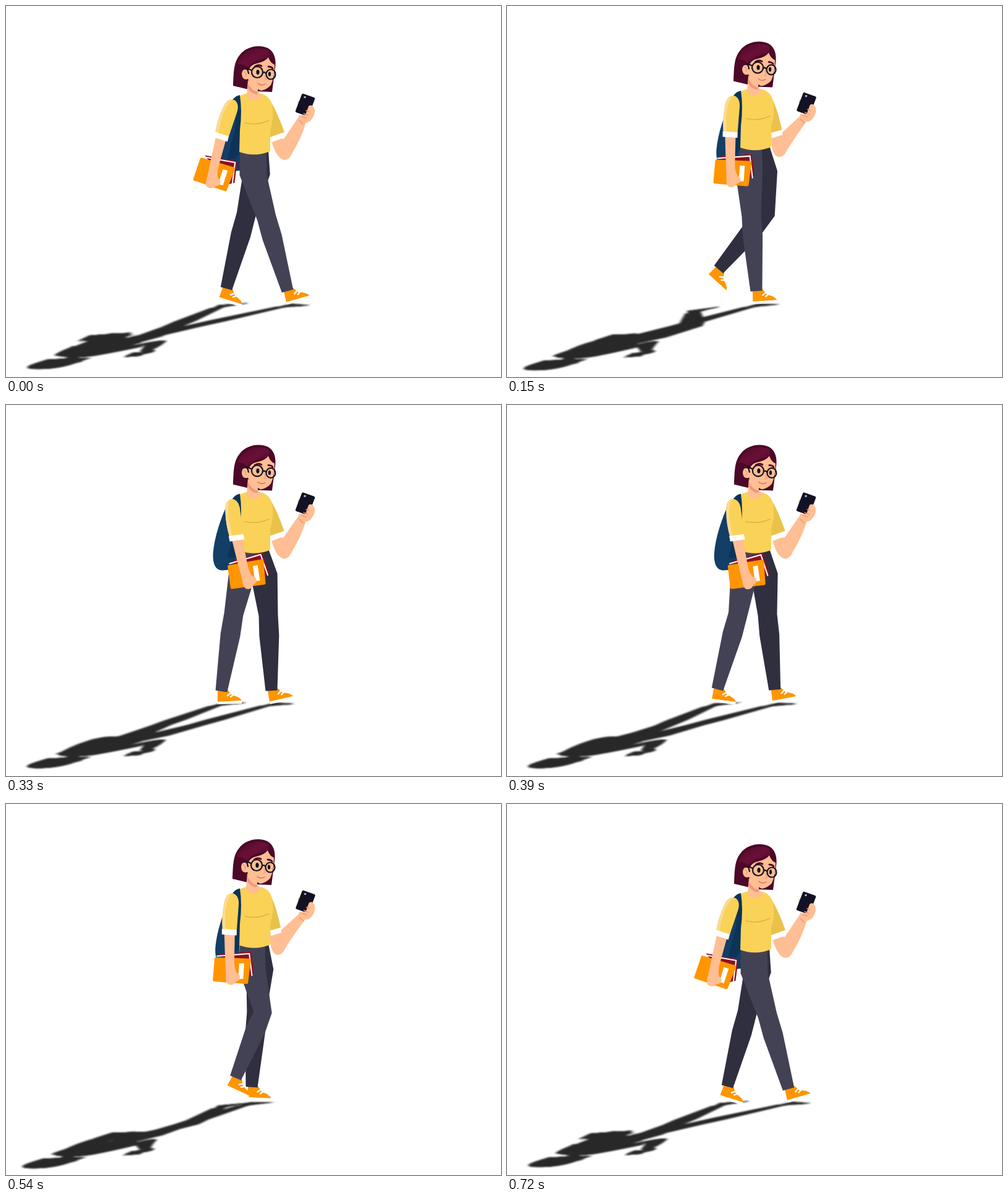
Recreate the animation shown at these times as an HTML page. Size 800 by 600 pixels, loop 750 ms.

```html
<!DOCTYPE html>
<html lang="en">
<head>
<meta charset="utf-8">
<title>Walking with a phone</title>
<style>
html, body { margin: 0; width: 100%; height: 100%; overflow: hidden; background: #fff }
svg { display: block; width: 800px; height: 600px }
.skin { fill: #ffbe93 } .tee { fill: #fad257 } .tee2 { fill: #e9c24c }
.orange { fill: #ff9500 } .white { fill: #fff } .hair { fill: #4c0828 }
.line { fill: none; stroke-linecap: round }
</style>
</head>
<body>
<svg viewBox="0 0 800 600">
  <defs>
    <filter id="shade" filterUnits="userSpaceOnUse" x="0" y="440" width="800" height="160" color-interpolation-filters="sRGB">
      <feColorMatrix values="0 0 0 0 .155  0 0 0 0 .155  0 0 0 0 .155  0 0 0 1 0"/>
      <feGaussianBlur stdDeviation="2.2 1.3"/>
    </filter>
    <linearGradient id="shine" x1="0" y1="0" x2="1" y2="1">
      <stop offset="0" stop-color="#4c0828"/><stop offset=".5" stop-color="#6a1038"/><stop offset="1" stop-color="#4c0828"/>
    </linearGradient>
    <g id="shoe">
      <path class="orange" d="M-6-4H9L17 6Q30 9 33 15L-6 17Z"/>
      <path class="white" d="M-6 17L33 15V20L-6 21Z"/>
      <path class="line" stroke="#fff" stroke-width="2.4" d="M10 7L15 3M15 9L20 5"/>
    </g>
  </defs>

  <g filter="url(#shade)"><use href="#walker" transform="matrix(1 0 .87 -.255 -412.2 604.2)"/></g>

  <g id="walker">
    <path id="pack" fill="#133e66" d="M362 158C350 185 340 214 338 240C337 258 342 267 352 268L376 266L380 160Z"/>
    <use id="farShoe" href="#shoe"/>
    <path id="farLeg" fill="#302f40"/>
    <use id="nearShoe" href="#shoe"/>
    <path id="nearLeg" fill="#434255"/>

    <path id="forearm" class="skin"/>
    <path id="sleeve" class="tee2"/>
    <path id="cuff" class="white"/>
    <g id="hand">
      <path class="skin" d="M473 153Q470 154 472 162L476 160Z"/>
      <path class="skin" d="M471 183L474 176L486 178L488 162Q492 159 497 164Q501 172 496 180Q492 188 485 189Z"/>
      <path fill="#131124" d="M481 142L498 148Q500 149 499 151L489 177Q488 179 486 178L469 172Q467 171 468 169L478 143Q479 141 481 142Z"/>
      <circle cx="483" cy="147.500" r="1.800" fill="#aab0cc"/>
      <path class="skin" d="M489 162Q494 158 498 165Q501 174 494 182L484 187L478 183L477 177L484 176Z"/>
      <path class="line" stroke="#ef9679" stroke-width="1.500" d="M478 179L485 181M481 174L488 177M485 169L490 171M474 185L480 191"/>
    </g>

    <g id="torso">
      <path class="tee" d="M378 145L389 141L414 142Q427 147 430 160Q434 180 427 201V235Q402 245 377 236L375 214L379 185Z"/>
      <path class="line" stroke="#dfb53f" stroke-width="1.500" d="M386 189Q405 194 425 185"/>
      <path fill="#0d3359" d="M366 152Q371 145 378 144Q382 170 378 201L377 238L370 248L358 247L371 195Q374 165 366 152Z"/>
    </g>

    <g id="head">
      <path class="hair" d="M367 129C368 105 368 91 378 79C389 65 409 62 423 68C434 74 437 86 435 100L430 139L404 138L388 134Z"/>
      <path fill="url(#shine)" d="M374 94C381 72 404 64 424 72Q428 80 422 84Q400 88 390 100Q383 92 374 94Z"/>
      <path class="skin" d="M391 120L389 145Q398 160 414 145L407 139V130Z"/>
      <path fill="#ef987b" d="M391 125Q398 139 408 139L405 143Q393 140 390 130Z"/>
      <path class="skin" d="M393 102Q396 95 405 93Q419 90 424 83Q427 92 434 95Q434 115 428 128Q422 135 412 137Q396 130 391 118Q382 121 381 110Q382 100 390 104Z"/>
      <path class="line" stroke="#ef987b" stroke-width="1.300" d="M385 106Q389 109 387 114M418 112L420 119L417 120"/>
      <path class="line" stroke="#d9695f" stroke-width="1.300" d="M407 125Q412 130 419 126"/>
      <path class="line" stroke="#4c0828" stroke-width="2.800" d="M402 98Q407 94 413 97M424 98Q429 98 431 101"/>
      <ellipse cx="407" cy="107" rx="2.600" ry="4" fill="#15101c"/>
      <ellipse cx="426" cy="110" rx="2.200" ry="3.800" fill="#15101c"/>
      <g class="line" stroke="#17131d" stroke-width="2.200">
        <circle cx="406" cy="107" r="9"/><ellipse cx="428" cy="110.500" rx="7.500" ry="8"/>
        <path d="M415 108Q418 106 420 109M397 104L390 101L392 109"/>
      </g>
    </g>

    <g id="arm">
      <path fill="#8c1024" d="M345 251L398 246L403 281L390 288Z"/>
      <path class="line" stroke="#fff" stroke-width="2" d="M343 254L395 249L400 284"/>
      <path class="orange" d="M341 256L396 257Q398 257 398 259L394 296Q394 298 391 298L339 295Q337 295 337 292L339 258Q339 256 341 256Z"/>
      <path class="white" d="M379 265H387L386 290H378Z"/>
      <path class="skin" d="M354 218H371V260Q371 281 380 284Q383 292 374 295Q370 303 361 299Q357 294 358 284L356 255Z"/>
      <path class="tee" d="M352 172Q354 152 367 152Q378 156 376 174L374 212H351Q349 190 352 172Z"/>
      <path fill="#fcd996" d="M352 172Q354 152 364 152Q355 166 355 188L356 211H351Q349 190 352 172Z"/>
      <path class="white" d="M350 210L374 211V220L350 219Z"/>
    </g>
  </g>
</svg>
<script>
const STEP = 30, STEPS = 24, CYCLE = STEP * STEPS;
const $ = id => document.getElementById(id);
const set = (id, name, value) => $(id).setAttribute(name, value);

// time, knee x, knee y, ankle x, ankle y, foot angle
const nearKeys = [
  [0, 421, 342, 455, 461, -13], [150, 395, 340, 403, 461, -1], [270, 379, 338, 371, 463, 0],
  [330, 368, 338, 348, 463, 0], [375, 370, 338, 339, 460, 8], [450, 390, 341, 351, 458, 17],
  [540, 415, 337, 371, 443, 28], [630, 418, 338, 407, 462, 10]
];
const farKeys = [
  [0, 388, 338, 356, 457, 20], [150, 419, 335, 342, 426, 45], [270, 422, 337, 391, 454, 17],
  [330, 424, 340, 429, 462, -10], [360, 424, 340, 438, 461, -10], [450, 414, 338, 417, 460, -2],
  [630, 396, 338, 377, 456, 13]
];
// time, swing of the arm
const armKeys = [[0, 15.5], [150, 1.5], [270, -6], [330, -11], [360, -12], [450, -5.5], [630, 8]];

// Cyclic cubic interpolation between keys
function sample(keys, t) {
  const n = keys.length;
  const key = i => keys[(i + n) % n].map((v, j) => j ? v : v + CYCLE * Math.floor(i / n));
  const i = keys.filter(k => k[0] <= t).length - 1;
  const [a, b, c, d] = [-1, 0, 1, 2].map(k => key(i + k));
  const span = c[0] - b[0], s = (t - b[0]) / span;
  return b.map((v, j) => {
    const m0 = (c[j] - a[j]) / (c[0] - a[0]) * span;
    const m1 = (d[j] - b[j]) / (d[0] - b[0]) * span;
    return v + m0 * s + (3 * (c[j] - v) - 2 * m0 - m1) * s * s + (2 * (v - c[j]) + m0 + m1) * s ** 3;
  }).slice(1);
}

function normal(p, q) {
  const dx = q[0] - p[0], dy = q[1] - p[1], len = Math.hypot(dx, dy);
  return [dy / len, -dx / len];
}
const mix = (p, q, s) => p.map((v, i) => v + (q[i] - v) * s);
const polygon = points => 'M' + points.map(p => p.map(v => v.toFixed(2))).join('L') + 'Z';

function drawLeg(name, keys, hipX, waistX, lift, t) {
  const [kx, ky, ax, ay, angle] = sample(keys, t);
  const hip = [hipX, 240 + lift], knee = [kx, ky], ankle = [ax, ay];
  const thigh = normal(hip, knee), shin = normal(knee, ankle);
  const hips = mix(hip, knee, .33);
  const joints = [
    [hips, [1, 0], 22], [knee, mix(thigh, shin, .5), 15.5],
    [mix(knee, ankle, .27), shin, 16], [ankle, shin, 9.5]
  ];
  const side = sign => joints.map(([p, n, w]) => p.map((v, i) => v + sign * w * n[i]));
  const top = 233 + lift;
  set(name + 'Leg', 'd', polygon([
    [waistX, top], ...side(-1), ...side(1).reverse(), [Math.min(424, hips[0] + 21), top]
  ]));
  set(name + 'Shoe', 'transform', `translate(${ax} ${ay}) rotate(${angle})`);
}

function draw(t) {
  const rise = (1 - Math.cos(4 * Math.PI * t / CYCLE)) / 2;
  const lift = -7.5 * rise;
  const [swing] = sample(armKeys, t);
  const move = (id, x, y) => set(id, 'transform', `translate(${x} ${y})`);

  drawLeg('near', nearKeys, 389, 378, lift, t);
  drawLeg('far', farKeys, 413, 392, lift, t);
  move('pack', swing * .3, lift);
  move('torso', 0, lift);
  move('head', -rise, -8 * rise);
  move('hand', .5 * rise, -2 * rise);
  set('arm', 'transform', `translate(0 ${lift}) rotate(${swing} 368 160)`);

  const ex = 451 - 11 * rise, ey = 249 - 5 * rise;
  const cx = 450 - 6 * rise, cy = 204 - 4 * rise;
  set('forearm', 'd', `M427 ${212 + lift}Q${ex - 15} ${ey - 3} ${ex - 2} ${ey}Q${ex + 7} ${ey} ${ex + 11} ${ey - 10}` +
    `Q${ex + 27} ${ey - 36} 485 ${187 - 2 * rise}L471 ${182 - 2 * rise}L${ex - 2} ${ey - 34}Z`);
  set('sleeve', 'd', `M422 ${147 + lift}Q434 ${160 + lift} ${cx} ${cy}L427 ${213 + lift}Z`);
  set('cuff', 'd', `M427 ${212 + lift}L${cx} ${cy}L${cx + 1} ${cy + 8}L428 ${221 + lift}Z`);
}

function frame() {
  const step = Math.floor(performance.now() / STEP) % (STEPS + 1);
  draw(step % STEPS * STEP);
  requestAnimationFrame(frame);
}
frame();
</script>
</body>
</html>
```
